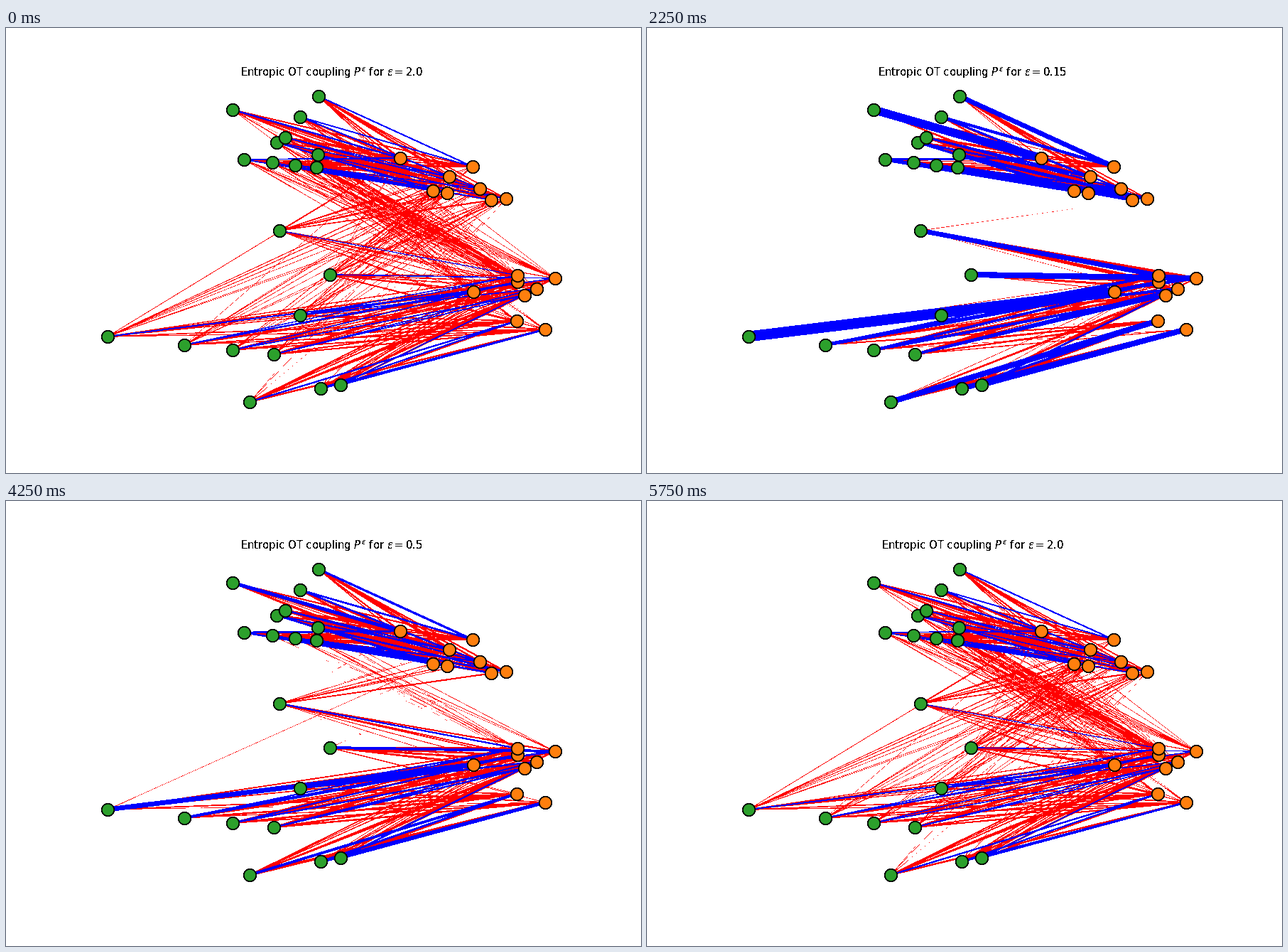
These frames come from a looping animation (894 px wide and 626 px high, 6 s). A matplotlib script:

```python
import numpy as np
import matplotlib.pyplot as plt
from matplotlib.animation import FuncAnimation
from matplotlib.collections import LineCollection

WIDTH, HEIGHT, DPI = 894, 626, 64
PT = 72 / DPI          # points per pixel
UNIT = (190, 140)      # pixels per unit of distance along x and y
STROKE = 350           # stroke width in pixels per unit of mass

# Even steps down to a quarter, then a finer tail.
EPSILONS = [*np.arange(8, 0, -1) / 4, 0.2, 0.15, 0.125, 0.1]


def chain(start, end, count, ease=0.7):
    """Points from start to end, crowding towards the end if ease < 1."""
    t = np.linspace(0, 1, count)[:, None] ** ease
    return (1 - t) * np.array(start) + t * np.array(end)


sources = np.vstack([
    chain((335, 185), (437, 196), 4, 0.85),
    chain((381, 161), (440, 96), 3, 0.85),
    chain((319, 115), (439, 178), 3),
    chain((143, 434), (377, 459), 4),
    chain((343, 526), (471, 502), 3, 0.35),
    [(385, 285), (456, 347), (414, 404)]])
sinks = np.vstack([
    chain((555, 183), (704, 240), 4),
    chain((683, 242), (601, 229), 3, 0.4),
    chain((773, 352), (730, 376), 3),
    chain((719, 412), (720, 348), 3, 0.22),
    [(657, 195), (658, 371), (759, 424)]])

cost = (((sources[:, None] - sinks[None]) / UNIT) ** 2).sum(axis=2)
log_a, log_b = -np.log(len(sources)), -np.log(len(sinks))


def logsumexp(m, axis):
    top = m.max(axis=axis, keepdims=True)
    return top + np.log(np.exp(m - top).sum(axis=axis, keepdims=True))


def sinkhorn(eps, g, rounds):
    """Coupling for one regularisation, starting from the potential g."""
    for _ in range(rounds):
        f = eps * (log_a - logsumexp((g - cost) / eps, 1))
        g = eps * (log_b - logsumexp((f - cost) / eps, 0))
    return np.exp((f + g - cost) / eps), g


def solve():
    """Couplings for all EPSILONS and the support of the unregularised plan."""
    plans = []
    g = np.zeros((1, len(sinks)))
    for eps in EPSILONS:
        plan, g = sinkhorn(eps, g, 500)
        plans.append(plan)
    for halving in range(1, 7):
        plan, g = sinkhorn(EPSILONS[-1] / 2 ** halving, g, 1500)
    return plans, plan > 0.004


def hard_edges(cut):
    """Filter that makes pixels solid where they are covered by at least cut."""
    def apply(img, dpi):
        out = img.copy()
        out[..., 3] = img[..., 3] >= cut
        return out, 0, 0
    return apply


plans, support = solve()

fig = plt.figure(figsize=(WIDTH / DPI, HEIGHT / DPI), dpi=DPI, facecolor="white")
ax = fig.add_axes([0, 0, 1, 1])
ax.axis("off")


def add_edges(mask, color, zorder):
    segments = [(sources[i], sinks[j]) for i, j in np.argwhere(mask)]
    edges = LineCollection(segments, colors=color, zorder=zorder,
                           agg_filter=hard_edges(0.5))
    ax.add_collection(edges, autolim=False)
    return edges, mask


def add_nodes(points, color):
    ax.scatter(*points.T, s=(17.56 * PT) ** 2, color=color, edgecolors="black",
               linewidths=1.86 * PT, zorder=3, agg_filter=hard_edges(0.5))


layers = [add_edges(~support, "red", 1), add_edges(support, "blue", 2)]
add_nodes(sources, "tab:green")
add_nodes(sinks, "tab:orange")
ax.set_xlim(0, WIDTH)
ax.set_ylim(HEIGHT, 0)
title = ax.text(458.2, 67.6, "", ha="center", va="baseline",
                fontsize=14.9 * PT, family="DejaVu Sans", color="black",
                agg_filter=hard_edges(0.35))


def draw(frame):
    # The schedule runs down and then back up.
    step = min(frame, 2 * len(EPSILONS) - 1 - frame)
    for edges, mask in layers:
        edges.set_linewidth(plans[step][mask] * STROKE * PT)
    title.set_text(r"Entropic OT coupling $P^\varepsilon$ for "
                   rf"$\varepsilon={EPSILONS[step]}$")
    return [edges for edges, _ in layers] + [title]


anim = FuncAnimation(fig, draw, frames=2 * len(EPSILONS), interval=250,
                     repeat=True, repeat_delay=0, blit=False)
plt.show()
```
